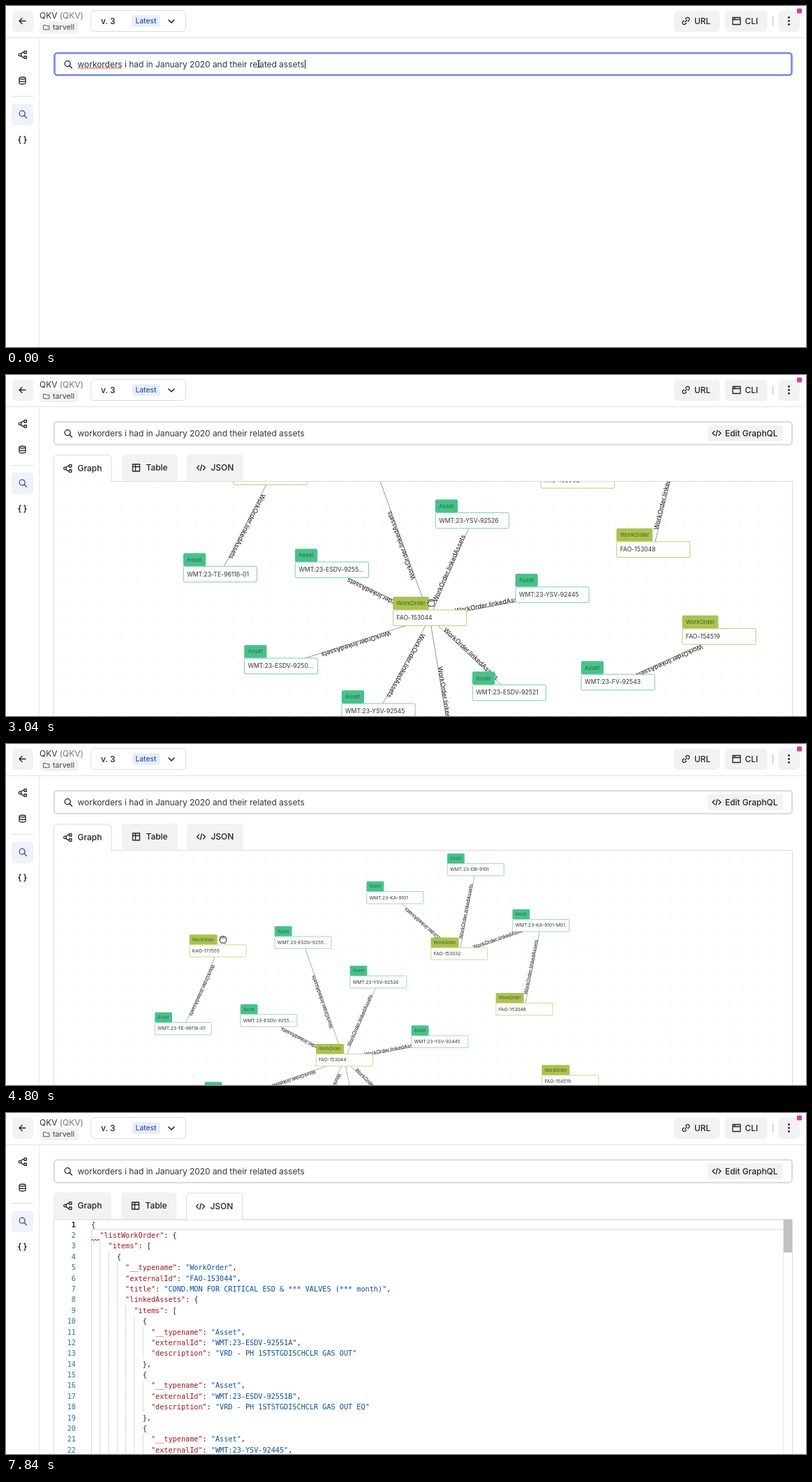
These frames come from a looping animation (1146x489 px, 8.16 s). An HTML page:

```html
<!DOCTYPE html>
<html lang="en">
<head>
<meta charset="utf-8">
<title>Query explorer</title>
<style>
html, body { margin: 0; width: 100%; height: 100%; overflow: hidden; background: #fff; }
svg { display: block; width: 1146px; height: 489px; }
text { font: 12px Inter, sans-serif; letter-spacing: -.003em; fill: #333; white-space: pre; }
.m { font-weight: 500; fill: #222; }
.code { font: 10.2px "DejaVu Sans Mono", monospace; letter-spacing: 0; fill: #222; }
.icon { fill: none; stroke: #222; stroke-width: 1.3; stroke-linecap: round; stroke-linejoin: round; }
</style>
</head>
<body>
<svg viewBox="0 0 1146 489">
  <defs><clipPath id="panel"><rect x="69" y="153" width="1057" height="336"/></clipPath></defs>
  <g id="chrome"></g>
  <g id="view"></g>
  <g id="pointer"></g>
</svg>
<script>
const LOOP = 8160, STEP = 80;
const RESULTS_AT = 640, LEGEND_AT = 4960, POPOVER_AT = 5040, POPOVER_END = 5600;
const TABLE_AT = 6080, JSON_AT = 7360;

const esc = s => s.replace(/&/g, '&amp;').replace(/</g, '&lt;');
const text = (x, y, s, attrs = '') => `<text x="${x}" y="${y}" ${attrs}>${esc(s)}</text>`;
const rect = (x, y, w, h, fill, r = 0, attrs = '') =>
  `<rect x="${x}" y="${y}" width="${w}" height="${h}" rx="${r}" fill="${fill}" ${attrs}/>`;
const line = (x1, y1, x2, y2, stroke, w = 1) =>
  `<path d="M${x1} ${y1}L${x2} ${y2}" stroke="${stroke}" stroke-width="${w}"/>`;
const lerp = (a, b, k) => a + (b - a) * k;
const smooth = k => k * k * (3 - 2 * k);

// Icons are drawn around their own centre.
const ICONS = {
  back: 'M4.5 0H-4.5M-.5-4L-4.5 0L-.5 4',
  chevron: 'M-4-2L0 2L4-2',
  folder: 'M-4-3H-1L0-1.7H4V3.3H-4Z',
  link: 'M-1.5 1.5L1.5-1.5M-.5-3L1-4.5A2.5 2.5 0 0 1 4.5-1L3 .5M.5 3L-1 4.5A2.5 2.5 0 0 1-4.5 1L-3-.5',
  window: 'M-5.5-5H5.5V5H-5.5ZM-5.5-2H5.5M-3-3.5H-2.5',
  search: 'M3.2-.8A4 4 0 1 1-4.8-.8A4 4 0 1 1 3.2-.8M2.2 2.2L5.5 5.5',
  nodes: 'M-2.2 0A1.8 1.8 0 1 1-5.8 0A1.8 1.8 0 1 1-2.2 0M1.6-3.6H.8Q-1.4-3.6-2.3-1M1.6 3.6H.8Q-1.4 3.6-2.3 1M2-5.3H5.4V-2H2ZM2 2H5.4V5.3H2Z',
  data: 'M-4.5-3.5C-4.5-5.5 4.5-5.5 4.5-3.5C4.5-1.5-4.5-1.5-4.5-3.5V3.5C-4.5 5.5 4.5 5.5 4.5 3.5V-3.5M-4.5 0C-4.5 2 4.5 2 4.5 0',
  braces: 'M-2.5-5C-4.5-5-3.8-2-4-1Q-4.2 0-5.5 0Q-4.2 0-4 1C-3.8 2-4.5 5-2.5 5M2.5-5C4.5-5 3.8-2 4-1Q4.2 0 5.5 0Q4.2 0 4 1C3.8 2 4.5 5 2.5 5',
  grid: 'M-5-5H5V5H-5ZM-5-1.5H5M-1-5V5',
  code: 'M-3-3L-6 0L-3 3M3-3L6 0L3 3M1-4L-1 4',
  list: 'M-2-3.5H5M-2 0H5M-2 3.5H5M-4.5-3.5H-4.3M-4.5 0H-4.3M-4.5 3.5H-4.3',
  expand: 'M1-1L5-5M2-5H5V-2M-1 1L-5 5M-5 2V5H-2',
  check: 'M-3.3 0L-1 2.4L3.5-2.6',
};
const icon = (name, x, y, attrs = '') =>
  `<path class="icon" d="${ICONS[name]}" transform="translate(${x} ${y})" ${attrs}/>`;

function drawChrome() {
  const menuDots = [16.5, 21.5, 26.5].map(y => `<circle cx="1121.5" cy="${y}" r="1.4" fill="#222"/>`).join('');
  return rect(9, 6.5, 30, 30.5, '#f2f2f5', 5) + icon('back', 23.5, 21.5) +
    `<text x="48" y="18">QKV <tspan fill="#777">(QKV)</tspan></text>` +
    rect(48, 22, 56, 17, '#f2f2f2', 4) + icon('folder', 58, 30.5, 'style="stroke:#555;stroke-width:1"') +
    text(67, 34, 'tarvell', 'style="font-size:10.8px;fill:#444"') +
    rect(121.5, 6.5, 136, 30, '#fff', 5, 'stroke="#dcdcdc"') + text(136, 26, 'v. 3', 'class="m"') +
    rect(180.5, 13, 40.5, 17, '#e8eefb', 4) +
    text(185.5, 25.3, 'Latest', 'style="font-size:10.3px;font-weight:500;fill:#2b4fb5"') +
    icon('chevron', 237, 22, 'style="stroke-width:1.6"') +
    rect(957, 6.5, 65.5, 30.5, '#f2f2f5', 5) + icon('link', 974, 21.5) + text(986, 26, 'URL', 'class="m"') +
    rect(1030, 6.5, 60.5, 30.5, '#f2f2f5', 5) + icon('window', 1046.5, 21.5) + text(1058.5, 26, 'CLI', 'class="m"') +
    line(1098.5, 15, 1098.5, 28, '#ccc', 1.6) +
    rect(1106.5, 6.5, 30.5, 30.5, '#f2f2f5', 5) + menuDots + rect(1133, 3.5, 7, 7, '#e532a4', 1.5) +
    line(0, 45.5, 1146, 45.5, '#e3e3e3') + line(47.5, 46, 47.5, 489, '#e8e8e8') +
    icon('nodes', 24, 70) + icon('data', 23.5, 107) + line(8, 129.5, 39, 129.5, '#dedede') +
    rect(8, 140, 31, 31, '#eff2fb', 5) + icon('search', 24, 155, 'style="stroke:#2b4fc4"') +
    icon('braces', 23.5, 192);
}

function drawSearch(t) {
  const focused = t < 160;
  const box = focused
    ? rect(69.5, 67.5, 1056, 31.5, '#fff', 4, 'stroke="#6f86f7" stroke-width="2.6"')
    : rect(69, 67.3, 1057, 32.4, '#fff', 4, 'stroke="#dadada" stroke-width="2"');
  const edit = focused
    ? '<path d="M103 89H166" stroke="#e04040" stroke-width="1.5" stroke-dasharray="1.6 1"/>' +
      line(428.5, 77, 428.5, 90, '#222')
    : '';
  const button = t >= RESULTS_AT
    ? rect(1005, 72, 108, 23, '#f2f2f2', 4) + icon('code', 1018, 83.5) + text(1030, 88, 'Edit GraphQL', 'class="m"')
    : '';
  return box + icon('search', 89, 83.5) +
    text(102.5, 88, 'workorders i had in January 2020 and their related assets') + edit + button;
}

function drawTabs(active) {
  const tabs = [['Graph', 'nodes', 68, 83], ['Table', 'grid', active ? 165 : 166, 79.5],
    ['JSON', 'code', active === 2 ? 258 : 259, 80.5]];
  const panel = line(68, 152.5, 1127, 152.5, '#dadada') +
    line(68.5, 152, 68.5, 489, '#dadada') + line(1126.5, 152, 1126.5, 489, '#dadada');
  return panel + tabs.map(([label, glyph, x, w], i) => {
    const on = i === active, y = on ? 134 : 133;
    const shape = on
      ? `<path d="M${x + .5} 153V120Q${x + .5} 115 ${x + 5.5} 115H${x + w - 5}Q${x + w} 115 ${x + w} 120V153" fill="#fff" stroke="#dadada"/>`
      : `<path d="M${x} 151.5V119Q${x} 114 ${x + 5} 114H${x + w - 5}Q${x + w} 114 ${x + w} 119V151.5Z" fill="#f2f2f2"/>`;
    return shape + icon(glyph, x + 20.5, y) + text(x + 34.5, y + 4.3, label, 'class="m"');
  }).join('');
}

const KINDS = {
  WorkOrder: { tag: '#a9c44c', ink: '#4c5a2b', border: '#bccd6b', width: 39.5 },
  Asset: { tag: '#45c389', ink: '#2e6650', border: '#74d1aa', width: 24.5 },
  WorkItem: { tag: '#c4573f', ink: '#fff', border: '#e09a8c', width: 36 },
};
// Offsets from the hub node: while spreading, once settled, after adding work items.
const NODES = {
  hub: ['WorkOrder', 'FAO-153044', 0, 0, 0, 0, 0, 0],
  a1: ['Asset', 'WMT:23-YSV-92526', 44.2, -101.2, 48, -110.5, 47.5, -109],
  a2: ['Asset', 'WMT:23-ESDV-9255...', -57, -151, -58.5, -166.5, -57.3, -164],
  a3: ['Asset', 'WMT:23-ESDV-9255...', -106.5, -48, -107, -56, -96.8, -51],
  a4: ['Asset', 'WMT:23-YSV-92445', 132, -24, 135, -26, 132.5, -24],
  a5: ['Asset', 'WMT:23-ESDV-9250...', -168, 51, -157.5, 54, -153, 53],
  a6: ['Asset', 'WMT:23-YSV-92545', -62.5, 94, -50.5, 109, -50, 109],
  a7: ['Asset', 'WMT:23-ESDV-92521', 87.6, 79, 86, 84, 86, 84],
  a8: ['Asset', 'WMT:23-ESDV-92522', 20, 177, 39, 192, 38, 192],
  kao: ['WorkOrder', 'KAO-177555', -168, -153, -179, -154.7, -179, -154.7],
  te: ['Asset', 'WMT:23-TE-96116-01', -229.5, -51.6, -228, -44.5, -227, -43],
  sys: ['WorkOrder', 'FAO-153032', 160, -150, 162.5, -150.5, 162, -145.7],
  ka: ['Asset', 'WMT:23-KA-9101', 70, -228, 71.6, -230, 72, -228],
  db: ['Asset', 'WMT:23-DB-9101', 184, -268, 185.7, -269.6, 187.5, -266],
  m01: ['Asset', 'WMT:23-KA-9101-M01', 267, -197, 278, -190.6, 277.5, -187],
  uni: ['WorkOrder', 'FAO-153048', 231, -78, 254.5, -72, 253, -68.6],
  valve: ['WorkOrder', 'FAO-154519', 311, 8.6, 319.5, 30, 320, 32.6],
  fv: ['Asset', 'WMT:23-FV-92543', 204.7, 67, 206, 73, 206, 74],
  item: ['WorkItem', 'FAO-1530-5-', -410, -47, -410, -47, -410, -47],
};
const EDGES = { hub: 'a1 a2 a3 a4 a5 a6 a7 a8', kao: 'te', sys: 'ka db m01', uni: 'm01', valve: 'fv' };
const BOX_W = 80.5, BOX_H = 17.6, TAG_H = 14.2;

// time, hub x, hub y, zoom, layout phase (-1 gathered, 0 spread, 1 settled, 2 with work items)
const CAMERA = [
  [640, 560, 330, 1, -1], [1840, 540, 342, 1.4, 0], [2400, 530, 347.3, 1.695, 0],
  [3600, 574, 328, 1, 1], [4800, 444, 444.3, 1.0125, 1], [5440, 444, 444.3, 1.0125, 2],
];
function sample(keys, t, ease = k => k) {
  const next = keys.findIndex(key => key[0] > t);
  if (next <= 0) return (next ? keys[keys.length - 1] : keys[0]).slice(1);
  const a = keys[next - 1], b = keys[next], k = ease((t - a[0]) / (b[0] - a[0]));
  return a.slice(1).map((v, i) => lerp(v, b[i + 1], k));
}

function place(name, phase) {
  const p = NODES[name].slice(2);
  if (phase < 0) return [p[0] * (1 + .65 * phase), p[1] * (1 + .65 * phase)];
  const i = Math.min(1, Math.floor(phase)), k = phase - i;
  return [lerp(p[2 * i], p[2 * i + 2], k), lerp(p[2 * i + 1], p[2 * i + 3], k)];
}

function drawTag(kind, x, y, size = 1) {
  const { tag, ink, width } = KINDS[kind];
  return `<g transform="translate(${x} ${y}) scale(${size})">` + rect(0, 0, width, TAG_H, tag, 1.5) +
    text(4, 9.3, kind, `style="font-size:6.15px;fill:${ink}"`) + '</g>';
}

function drawEdge(from, to) {
  const [x1, y1] = from, [x2, y2] = to, cx = BOX_W / 2, cy = BOX_H / 2;
  const angle = Math.atan2(y2 - y1, x2 - x1) * 180 / Math.PI;
  return line(x1 + cx, y1 + cy, x2 + cx, y2 + cy, '#777', .6) +
    `<g transform="translate(${(x1 + x2) / 2 + cx} ${(y1 + y2) / 2 + cy}) rotate(${angle})">` +
    text(0, 0, 'WorkOrder.linkedAssets', 'text-anchor="middle" style="font-size:7px;fill:#111"') + '</g>';
}

function drawNode(name, [x, y], t) {
  const [kind, label] = NODES[name];
  const eye = name === 'kao' && t >= POPOVER_AT
    ? '<path d="M68.5 8.6Q72.3 3.6 76 8.6Q72.3 13.6 68.5 8.6Z" fill="none" stroke="#2b8a72" stroke-width=".9"/><circle cx="72.3" cy="8.6" r="1.4" fill="#2b8a72"/>'
    : '';
  return `<g transform="translate(${x} ${y})">` + drawTag(kind, 0, -TAG_H) +
    rect(.2, .2, BOX_W - .4, BOX_H - .4, '#fff', 1, `stroke="${KINDS[kind].border}" stroke-width=".75"`) +
    text(4, 11, label, 'style="font-size:6.62px"') + eye + '</g>';
}

function drawLegend(t) {
  const size = 1.695;
  let popover = '';
  if (t >= POPOVER_AT && t < POPOVER_END) {
    popover = rect(71, 190, 191, 90, '#000', 14, 'opacity=".07"') +
      rect(79, 197.5, 175.5, 75, '#000', 6, 'opacity=".16"') + rect(79, 197, 175, 74.5, '#fff', 6) +
      ['linkedAssets: Asset[]', 'workItems: WorkItem[]'].map((label, i) => {
        const y = 219 + 31 * i;
        return rect(93, y - 7, 13.5, 14, '#4a67fb', 3) +
          icon('check', 99.7, y, 'style="stroke:#fff;stroke-width:1.8"') +
          text(113.5, y + 4.3, label, 'style="fill:#444"');
      }).join('');
  }
  return popover + drawTag('WorkOrder', 79, 173, size) +
    drawTag('Asset', 79, 282, size) + drawTag('WorkItem', 79, 316, size);
}

function drawGraph(t) {
  const [x, y, zoom, phase] = sample(CAMERA, t, smooth);
  const at = {};
  for (const name in NODES) if (name !== 'item' || t >= 5200) at[name] = place(name, phase);
  const edges = Object.entries(EDGES).flatMap(([from, list]) =>
    list.split(' ').map(to => drawEdge(at[from], at[to]))).join('');
  const nodes = Object.keys(at).map(name => drawNode(name, at[name], t)).join('');
  const camera = `translate(${x} ${y}) scale(${zoom})`;
  return `<pattern id="dots" width="20.5" height="20.5" patternUnits="userSpaceOnUse" patternTransform="${camera}">` +
    '<circle cx="10" cy="10" r=".5" fill="#cfcfcf"/></pattern>' +
    `<g clip-path="url(#panel)">${rect(69, 153, 1057, 336, 'url(#dots)')}` +
    `<g transform="${camera}">${edges}${nodes}</g>${t >= LEGEND_AT ? drawLegend(t) : ''}</g>`;
}

const ROWS = [
  ['FAO-153044', 'COND.MON FOR CRITICAL ESD & *** VALVES (*** month)', 'WMT:23-ESDV-92551A...'],
  ['FAO-155178', 'PH(***)- *** AV INTERLOCK VENTILER (*** month)', 'WMT:23-HV-92527-01...'],
  ['FAO-154519', '*** VENTILER: KONTROLL AV *** (*** month)', 'WMT:23-FV-92543'],
  ['FAO-153032', '<PH> CMR FOR KU VD SYSTEM *** AND PULSEKEEPER (*** month)', 'WMT:23-DB-9101...'],
  ['KAO-177555', 'PH, ***. TRINNS ***, *** ***-SIGNAL THRUST LAGER', 'WMT:23-TE-96116-01'],
  ['FAO-153048', '<PH> CMR FOR NORVATE FOR *** SYSTEM (*** month)'.replace('NORVATE FOR', 'NORVATE'), 'WMT:23-KA-9101-M01'],
];
ROWS[5][1] = '<PH> CMR FOR NORVATE FOR *** SYSTEM (*** month)';

function drawTable(t) {
  const [, pointerY] = sample(POINTER, t);
  const head = text(82.5, 179.3, 'externalId:', 'class="m"') + text(239.5, 179.3, 'title: String', 'class="m"') +
    text(861, 179.3, 'linkedAssets: Asset', 'class="m"') + icon('list', 986, 175, 'style="stroke-width:1.1"') +
    [225, 847, 1125.5].map(x => line(x, 153, x, 198, '#d8d8d8', 2)).join('') + line(69, 198, 1126, 198, '#dedede');
  const rows = ROWS.map(([id, title, asset], i) => {
    const top = 198.3 + 51.9 * i, mid = top + 25.9;
    const hover = pointerY > top && pointerY < top + 51.9;
    return (hover ? rect(69, top, 1057, 51.9, '#f3f3f3') : '') + line(69, top + 51.9, 1126, top + 51.9, '#efefef') +
      text(82.5, mid + 4.2, `"${id}"`) + text(239.5, mid + 4.2, `"${title}"`) + text(861, mid + 4.2, asset) +
      rect(1088.5, mid - 12, 24, 24, i % 2 ? '#ececf1' : '#f4f4f6', 4) + icon('expand', 1100.5, mid);
  }).join('');
  return rows + head;
}

const assetLines = (id, about) => ['            {', '              "__typename": "Asset",',
  `              "externalId": "${id}",`, `              "description": "${about}"`, '            },'];
const JSON_LINES = ['{', '  "listWorkOrder": {', '    "items": [', '      {',
  '        "__typename": "WorkOrder",', '        "externalId": "FAO-153044",',
  `        "title": "${ROWS[0][1]}",`, '        "linkedAssets": {', '          "items": [',
  ...assetLines('WMT:23-ESDV-92551A', 'VRD - PH 1STSTGDISCHCLR GAS OUT'),
  ...assetLines('WMT:23-ESDV-92551B', 'VRD - PH 1STSTGDISCHCLR GAS OUT EQ'),
  ...assetLines('WMT:23-YSV-92445', '').slice(0, 3)];

function drawJson() {
  const pitch = 15.38, step = 6.14;
  const rows = JSON_LINES.map((source, i) => {
    const indent = source.search(/\S/), y = 163.7 + pitch * i;
    const guides = Array.from({ length: indent / 2 }, (_, k) => {
      const x = 122.5 + 2 * step * k;
      return line(x, y - 11, x, y - 11 + pitch, '#d6d6d6');
    }).join('');
    const colored = esc(source.trim()).replace(/"[^"]*"(:?)/g, (s, colon) =>
      `<tspan fill="${colon ? '#a31515' : '#0451a5'}">${colon ? s.slice(0, -1) : s}</tspan>${colon}`);
    return guides + text(100, y, String(i + 1),
      `class="code" text-anchor="end" style="fill:${i ? '#237893' : '#0b216f'};font-weight:${i ? 400 : 700}"`) +
      `<text class="code" x="${122 + step * indent}" y="${y}">${colored}</text>`;
  }).join('');
  return '<g clip-path="url(#panel)">' + line(122, 153.5, 1114, 153.5, '#eee', 2) +
    line(122, 167, 1114, 167, '#e8e8e8', 2) + rows +
    '<path d="M122 183l2-2 2 2 2-2 2 2 2-2 2 2" fill="none" stroke="#e51400"/>' +
    line(1113.5, 153, 1113.5, 489, '#e8e8e8') + rect(1114, 152, 12, 48, '#c1c1c1') + '</g>';
}

const POINTER = [
  [0, 362, 83], [160, 362, 83], [1040, 590, 320], [2400, 576, 356], [3600, 638.5, 300.5],
  [4800, 311, 280], [5120, 100, 250], [5440, 351, 232.5], [6000, 205, 133],
  [6640, 315, 303.5], [6960, 315, 303.5], [7280, 299, 133], [7440, 330, 180], [7760, 507.5, 382.5],
];
const POINTER_SHAPES = {
  beam: '<path d="M-2.3-5.2Q0-5.2 0-3.5Q0-5.2 2.3-5.2M0-3.5V3.5M-2.3 5.2Q0 5.2 0 3.5Q0 5.2 2.3 5.2" fill="none" stroke="#222"/>',
  arrow: '<path d="M0 0V9L2.1 7.1L3.6 10.4L5.2 9.7L3.8 6.6H6.6Z" fill="#000" stroke="#fff" paint-order="stroke"/>',
  hand: '<path d="M-3 5.3Q-4.2 3-5.5 1Q-5.5-.8-3.6.2L-4.4-2.8Q-3.4-4.8-2.2-3.2Q-1.6-5.8 0-4Q1.3-5.6 2.2-3.4Q4-4.5 4.3-2.3Q5.3 2 3.4 5.3Z" fill="#fff" stroke="#222" stroke-linejoin="round"/>' +
    '<path d="M-2.2-3.2L-1.7-.8M0-4V-1M2.2-3.4L2-1" stroke="#222" stroke-width=".8"/>',
};
function drawPointer(t) {
  if (t >= 7840) return '';
  const [x, y] = sample(POINTER, t);
  const overSearch = y > 67 && y < 100, overPanel = y > 153;
  let shape = 'arrow';
  if (overSearch || (t >= JSON_AT && overPanel)) shape = 'beam';
  else if (t >= RESULTS_AT && t < TABLE_AT && overPanel) shape = 'hand';
  return `<g transform="translate(${x} ${y})">${POINTER_SHAPES[shape]}</g>`;
}

const view = document.getElementById('view'), pointer = document.getElementById('pointer');
document.getElementById('chrome').innerHTML = drawChrome();

function render(t) {
  let content = '';
  if (t >= JSON_AT) content = drawTabs(2) + drawJson();
  else if (t >= TABLE_AT) content = drawTabs(1) + drawTable(t);
  else if (t >= RESULTS_AT) content = drawTabs(0) + drawGraph(t);
  view.innerHTML = drawSearch(t) + content;
  pointer.innerHTML = drawPointer(t);
}

const start = performance.now();
let shown = -1;
function tick() {
  const t = Math.floor((performance.now() - start) % LOOP / STEP) * STEP;
  if (t !== shown) render(shown = t);
  requestAnimationFrame(tick);
}
tick();
</script>
</body>
</html>
```
